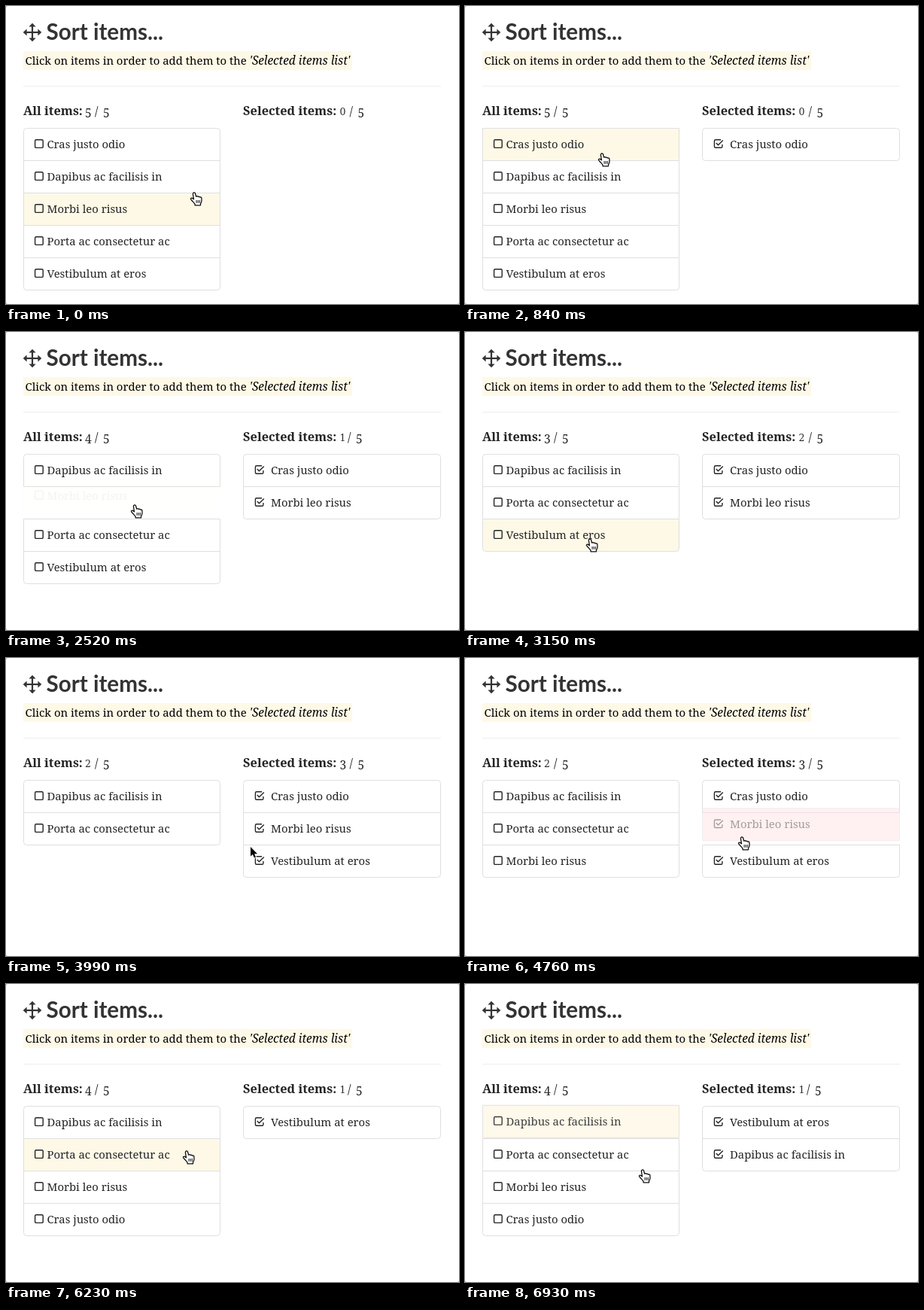
Write an HTML page with a canvas that moves like this. It is 602 px wide and 396 px high and loops after 7000 ms.

```html
<!DOCTYPE html>
<html lang="en">
<head>
<meta charset="utf-8">
<title>Sort items</title>
<style>
  html, body { margin: 0; width: 100%; height: 100%; overflow: hidden; background: #fff; }
  canvas { display: block; width: 602px; height: 396px; }
</style>
</head>
<body>
<canvas id="stage" width="602" height="396"></canvas>
<script>
const ctx = document.getElementById('stage').getContext('2d');
const LOOP = 7000, STEP = 70, LEAVE = 630;
const TOP = 162, PITCH = 43;
const SERIF = '"Noto Serif", Georgia, serif';
const INK = '#242424', CREAM = '#fef9e7', PINK = '#ffdede';
const ITEMS = ['Cras justo odio', 'Dapibus ac facilisis in', 'Morbi leo risus',
  'Porta ac consectetur ac', 'Vestibulum at eros'];
const SIDES = [
  { x: 23, width: 261, textX: 54.5, boxX: 37.8, hover: CREAM },
  { x: 315, width: 262, textX: 352, boxX: 330.6, hover: PINK }
];

// Clicks: time, item, list it leaves.
const CLICKS = [[840, 0, 0], [1925, 2, 0], [3220, 4, 0], [4390, 2, 1], [5530, 0, 1], [6850, 1, 0]];

// Pointer tip: start time, end time, destination.
const START = [250, 248];
const MOVES = [
  [0, 560, 182, 196], [1470, 1680, 177, 231], [1820, 2310, 171, 230],
  [2590, 3080, 166, 275], [3360, 3920, 324, 251], [3990, 4270, 368, 238],
  [5040, 5390, 370.5, 188], [5740, 6230, 240, 222], [6300, 6580, 236, 190],
  [6790, 6930, 236, 247]
];

const HAND = new Path2D('M4.2 1.6C5 .4 6.6 .6 7 2L8.2 6.2C9 5.4 10.4 5.6 10.8 6.6' +
  'C11.6 5.9 12.8 6.2 13.2 7.2C14.2 6.6 15.3 7.2 15.4 8.6L15.5 12' +
  'C15.4 13.5 14.4 14.8 14 16V17.8H6.6V16.2C5 14.4 3.6 12.4 1.4 10.2' +
  'C.2 8.8 1.6 7.6 3 8.4L5 9.8L3.9 2.8Z');
const CREASES = new Path2D('M8.6 11V14.8M10.7 11V14.8M12.8 11V14.8');
const ARROW = new Path2D('M0 0V12.6L2.9 10L4.9 14.6L7 13.7L5.1 9.2H9Z');

function text(str, x, y, font, color = INK) {
  ctx.font = font;
  ctx.fillStyle = color;
  ctx.fillText(str, x, y);
}

function pointerAt(t) {
  let [x, y] = START;
  for (const [from, to, toX, toY] of MOVES) {
    if (t <= from) break;
    const p = Math.min(1, (t - from) / (to - from));
    const ease = p * p * (3 - 2 * p);
    x += (toX - x) * ease;
    y += (toY - y) * ease;
  }
  return { x, y, hand: x < 285 || x > 333 };
}

function stateAt(t) {
  const lists = [[0, 1, 2, 3, 4], []];
  let selected = 0, leaving = null;
  for (const [time, item, side] of CLICKS) {
    if (t < time) break;
    lists[1 - side].push(item);
    const progress = (t - time) / LEAVE;
    if (progress < 1) {
      leaving = { item, side, progress };
    } else {
      lists[side] = lists[side].filter(other => other !== item);
      selected += side ? -1 : 1;
    }
  }
  return { lists, selected, leaving };
}

function checkbox(x, y, checked) {
  ctx.strokeStyle = INK;
  ctx.lineWidth = 1.4;
  ctx.beginPath();
  if (checked) {
    ctx.moveTo(x + 9.5, y + .8);
    ctx.lineTo(x + 2.4, y + .8);
    ctx.quadraticCurveTo(x + .8, y + .8, x + .8, y + 2.4);
    ctx.lineTo(x + .8, y + 9.8);
    ctx.quadraticCurveTo(x + .8, y + 11.3, x + 2.4, y + 11.3);
    ctx.lineTo(x + 9.7, y + 11.3);
    ctx.quadraticCurveTo(x + 11.3, y + 11.3, x + 11.3, y + 9.7);
    ctx.lineTo(x + 11.3, y + 7);
    ctx.moveTo(x + 3.2, y + 5);
    ctx.lineTo(x + 5.8, y + 7.8);
    ctx.lineTo(x + 12.2, y + 1.6);
  } else {
    ctx.roundRect(x + .8, y + .8, 10.6, 10.6, 1.5);
  }
  ctx.stroke();
}

function row(item, side, y, fill, radii) {
  const { x, width, textX, boxX } = SIDES[side];
  ctx.beginPath();
  ctx.roundRect(x + .5, y + .5, width, PITCH, radii);
  ctx.fillStyle = fill;
  ctx.fill();
  ctx.strokeStyle = '#dfdfdf';
  ctx.lineWidth = 1;
  ctx.stroke();
  checkbox(boxX, y + 15, side === 1);
  text(ITEMS[item], textX, y + 27, `14.85px ${SERIF}`);
}

function drawLists({ lists, leaving }, tip) {
  let floating = null;
  lists.forEach((list, side) => list.forEach((item, i) => {
    const y = TOP + PITCH * i, { x, width, hover } = SIDES[side];
    if (leaving && leaving.item === item && leaving.side === side) {
      floating = { item, side, y };
      return;
    }
    const over = !leaving && tip.hand && tip.x > x && tip.x < x + width &&
      tip.y >= y && tip.y < y + PITCH;
    const head = i === 0 ? 4 : 0, foot = i === list.length - 1 ? 4 : 0;
    row(item, side, y, over ? hover : '#fff', [head, head, foot, foot]);
  }));
  if (floating) {
    ctx.globalAlpha = 1 - leaving.progress;
    row(floating.item, floating.side, floating.y - 10 * leaving.progress,
      SIDES[floating.side].hover, 0);
    ctx.globalAlpha = 1;
  }
}

// Old-style figures: 0-2 stand at x-height, 3-5 hang below the baseline.
function figure(n, x) {
  if (n < 3) text(n, x, 145, '12.5px "DejaVu Serif", serif');
  else text(n, x, 148, `15.5px ${SERIF}`);
}

function counter(label, n, x, numberX) {
  text(label, x, 145, `bold 16.35px ${SERIF}`);
  const shift = n === 1 ? -2.5 : 0;
  figure(n, numberX);
  text('/', numberX + 13 + shift, 146, `15.5px ${SERIF}`);
  figure(5, numberX + 24 + shift);
}

function moveIcon(x, y) {
  ctx.save();
  ctx.translate(x, y);
  ctx.fillStyle = '#333';
  for (let i = 0; i < 4; i++) {
    ctx.fillRect(-1.1, -9, 2.2, 10);
    ctx.beginPath();
    ctx.moveTo(0, -12.3);
    ctx.lineTo(4.6, -7.4);
    ctx.lineTo(-4.6, -7.4);
    ctx.fill();
    ctx.rotate(Math.PI / 2);
  }
  ctx.restore();
}

function drawPage() {
  ctx.fillStyle = '#c4c4c4';
  ctx.fillRect(0, 0, 602, 396);
  ctx.fillStyle = '#fff';
  ctx.beginPath();
  ctx.roundRect(0, 0, 602, 396, 3);
  ctx.fill();
  moveIcon(35, 35);
  text('Sort items...', 53.5, 45, 'bold 29.6px Lato, sans-serif', '#333');
  ctx.fillStyle = CREAM;
  ctx.fillRect(23, 60, 437, 25);
  text('Click on items in order to add them to the', 25.5, 78, `14.9px ${SERIF}`, '#000');
  text("'Selected items list'", 323.5, 78, `italic 15.4px ${SERIF}`, '#000');
  ctx.fillStyle = '#eee';
  ctx.fillRect(23, 106, 555, 1);
}

function drawPointer({ x, y, hand }) {
  ctx.save();
  ctx.lineJoin = 'round';
  if (hand) {
    ctx.translate(x - 5.5, y - 1);
    ctx.fillStyle = '#fff';
    ctx.strokeStyle = '#111';
    ctx.lineWidth = 1.3;
    ctx.fill(HAND);
    ctx.stroke(HAND);
    ctx.lineWidth = 1;
    ctx.stroke(CREASES);
  } else {
    ctx.translate(x + 1, y);
    ctx.strokeStyle = '#fff';
    ctx.lineWidth = 2;
    ctx.stroke(ARROW);
    ctx.fillStyle = '#000';
    ctx.fill(ARROW);
  }
  ctx.restore();
}

function draw(t) {
  const state = stateAt(t), tip = pointerAt(t);
  drawPage();
  counter('All items:', 5 - state.selected, 23, 105);
  counter('Selected items:', state.selected, 315, 443.5);
  drawLists(state, tip);
  drawPointer(tip);
}

const began = performance.now();
function tick() {
  const t = (performance.now() - began) % LOOP;
  draw(Math.floor(t / STEP) * STEP);
  requestAnimationFrame(tick);
}
tick();
</script>
</body>
</html>
```
